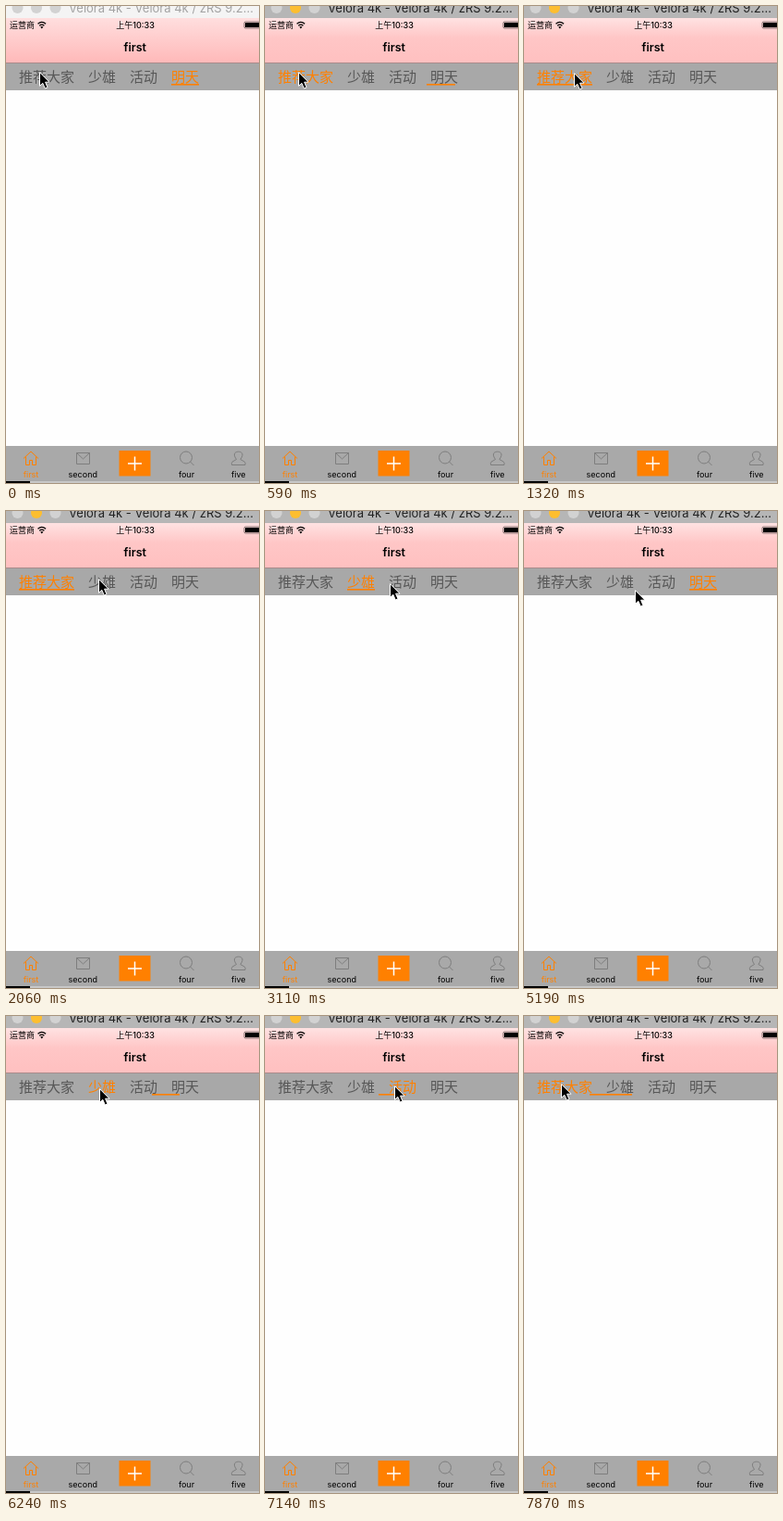
An HTML page for the animation above (8000 ms loop, 274x515 px).

```html
<!DOCTYPE html>
<html lang="zh-CN">
<head>
<meta charset="utf-8">
<title>Tabs</title>
<style>
html, body { margin: 0; width: 100%; height: 100%; overflow: hidden; background: #fefefe; }
svg { display: block; width: 274px; height: 515px; font-family: Inter, "Noto Sans CJK SC", "Noto Sans CJK", sans-serif; }
.mid { text-anchor: middle; }
.small { font-size: 9px; }
.status { font-weight: 500; }
.icon { fill: none; stroke: #7e7e7e; }
#tabs { font: 15px "Noto Sans CJK SC", "Noto Sans CJK", sans-serif; }
</style>
</head>
<body>
<svg viewBox="0 0 274 515">
  <defs>
    <linearGradient id="idle" x2="0" y2="1">
      <stop stop-color="#ffdede"/><stop offset="1" stop-color="#ffb9b9"/>
    </linearGradient>
    <linearGradient id="active" x2="0" y2="1">
      <stop stop-color="#ffe2e2"/><stop offset=".45" stop-color="#ffc6c6"/><stop offset="1" stop-color="#ffc0c0"/>
    </linearGradient>
  </defs>

  <!-- window title -->
  <rect id="bar" width="274" height="13"/>
  <g fill="#d2d2d2">
    <circle cx="12.5" cy="2" r="6"/><circle id="dot" cx="33" cy="2" r="6"/><circle cx="53.5" cy="2" r="6"/>
  </g>
  <text id="caption" x="68" y="7" font-size="13">Velora 4k - Velora 4k / zRS 9.2...</text>

  <!-- status and navigation -->
  <rect id="nav" y="13" width="274" height="48"/>
  <rect y="61" width="274" height="1" fill="#a98b8b"/>
  <g class="small status">
    <text x="4" y="24">运营商</text>
    <text x="140" y="24" class="mid">上午10:33</text>
  </g>
  <path d="M34.5 19.2q4.3-3.6 8.6 0M36.2 21.2q2.6-2.2 5.2 0" fill="none" stroke="#000" stroke-width="1.3"/>
  <path d="M37.2 22.6q1.6-1.2 3.2 0l-1.6 1.9z"/>
  <rect x="258" y="17" width="20" height="7" rx="1.5" fill="none" stroke="#000" stroke-width=".5"/>
  <rect x="259" y="18" width="18" height="5" rx=".5"/>
  <text x="139.7" y="49" class="mid" font-size="12.5" font-weight="600">first</text>

  <!-- tab strip -->
  <rect y="62" width="274" height="29" fill="#a8a8a8"/>
  <g id="tabs"></g>
  <rect id="line" y="84" height="1.6" fill="#ff8000"/>

  <!-- bottom bar -->
  <rect y="475" width="274" height="38" fill="#a9a9a9"/>
  <rect y="513" width="274" height="2" fill="#c8c8c8"/>
  <rect y="513" width="26" height="2"/>
  <g class="icon">
    <path d="M19 488.5l8-7.5 8 7.5M21.5 486.5v9h4v-5h3v5h4v-9" stroke="#ff8000"/>
    <path d="M76.5 482.5h14v12h-14zl7 6.5 7-6.5"/>
    <circle cx="195" cy="487.5" r="6.5"/><path d="M199.5 492l4 4"/>
    <path d="M249.5 489.5c-5-7 0-8.3 2.2-8.3s7.2 1.3 2.2 8.3l4.6 2.7q1 1 .5 3.3h-14.5q-.5-2.3.5-3.3z"/>
  </g>
  <rect x="122.5" y="480" width="34" height="27.5" fill="#ff8000"/>
  <path d="M132 494h15M139.5 486.5v15" stroke="#fff" stroke-width="1.5"/>
  <g class="small mid">
    <text x="27" y="509" fill="#ff8000">first</text>
    <text x="83.3" y="509">second</text>
    <text x="195.5" y="509">four</text>
    <text x="251.7" y="509">five</text>
  </g>

  <path id="cursor" d="M.5 .7V15.3L3.8 12.3 6.3 18 9 16.9 6.6 11.2H11Z" stroke="#fff"/>
</svg>
<script>
const $ = id => document.getElementById(id);
const set = (el, attrs) => { for (const k in attrs) el.setAttribute(k, attrs[k]); };
const mix = (a, b, p) => a + (b - a) * p;
const clamp = p => Math.max(0, Math.min(1, p));
const ease = p => p * p * (3 - 2 * p);

// Tabs sit side by side, one glyph (15px) apart
const size = 15;
let left = 14;
const tabs = ['推荐大家', '少雄', '活动', '明天'].map(name => {
  const tab = {name, x: left, width: name.length * size};
  left += tab.width + size;
  return tab;
});
$('tabs').innerHTML = tabs.map(({name, x}) => `<text x="${x}" y="82">${name}</text>`).join('');
const labels = [...$('tabs').children];

// The screen refreshes in steps; the times below count these steps
const step = 148.4, lead = 18, slide = 1.68;
const clicks = [
  {at: 3.85, tab: 0}, {at: 14.8, tab: 1}, {at: 22.8, tab: 2}, {at: 28.7, tab: 3},
  {at: 41.48, tab: 1}, {at: 46.87, tab: 2}, {at: 52.13, tab: 0},
];
const moves = [
  {from: 7, to: 14, x: 100, y: 73}, {from: 18, to: 21, x: 135, y: 78}, {from: 24, to: 27, x: 185, y: 76},
  {from: 31, to: 35, x: 120, y: 85}, {from: 38, to: 40, x: 101, y: 78}, {from: 44, to: 45, x: 140, y: 75},
  {from: 49, to: 52, x: 40, y: 73},
];

function draw(time) {
  const now = Math.floor((time + lead) / step);

  const active = now > clicks[0].at;
  set($('bar'), {fill: active ? '#b6b6b6' : '#f4f4f4'});
  set($('dot'), {fill: active ? '#fdbe30' : '#d2d2d2'});
  set($('caption'), {fill: active ? '#222' : '#a3a3a3'});
  set($('nav'), {fill: `url(#${active ? 'active' : 'idle'})`});

  let selected = 3, {x, width} = tabs[selected];
  for (const {at, tab} of clicks) {
    if (now < at) break;
    const p = ease(clamp((now - at) / slide));
    x = mix(x, tabs[tab].x, p);
    width = mix(width, tabs[tab].width, p);
    selected = tab;
  }
  set($('line'), {x: Math.round(x), width: Math.round(width)});
  labels.forEach((el, i) => set(el, {fill: i === selected ? '#ff8000' : '#575757'}));

  let cx = 36, cy = 71;
  for (const m of moves) {
    const p = clamp((now - m.from) / (m.to - m.from));
    cx = mix(cx, m.x, p);
    cy = mix(cy, m.y, p);
  }
  set($('cursor'), {transform: `translate(${Math.round(cx)} ${Math.round(cy)})`});
}

const origin = performance.now();
function loop() {
  draw((performance.now() - origin) % 8000);
  requestAnimationFrame(loop);
}
loop();
</script>
</body>
</html>
```
